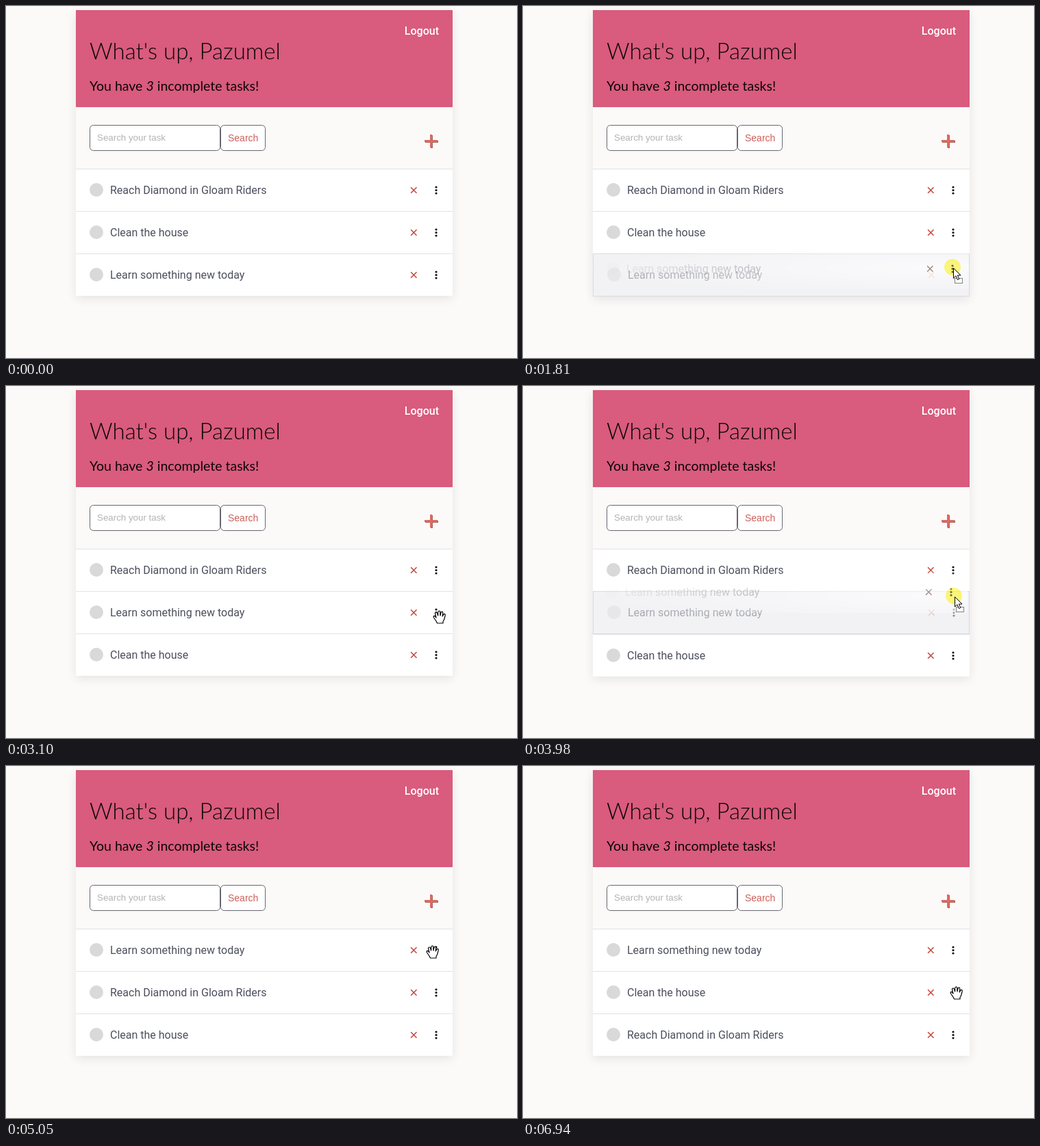
Recreate the animation shown at these times as an HTML page with a canvas. Size 746 by 515 pixels, loop 8530 ms.

```html
<!DOCTYPE html>
<html lang="en">
<head>
<meta charset="utf-8">
<title>Task list</title>
<style>
  html, body { margin: 0; width: 100%; height: 100%; overflow: hidden; background: #fbfaf9; }
  canvas { display: block; }
</style>
</head>
<body>
<canvas id="stage" width="746" height="515"></canvas>
<script>
const LOOP = 8530;
const FRAME = 68;       // pointer sampling interval
const SWAP_DELAY = 70;  // the list reacts one sample after the pointer
const CARD = { x: 102, y: 6, w: 550, h: 418, listTop: 238, row: 62 };
const TASKS = ['Reach Diamond in Gloam Riders', 'Clean the house', 'Learn something new today'];
const TITLE_FONT = 'Lato, "Open Sans", sans-serif';
const ROW_FONT = 'Roboto, "Noto Sans", sans-serif';
const FORM_FONT = '"Liberation Sans", Arial, sans-serif';

const smooth = p => (1 - Math.cos(Math.PI * p)) / 2;
const easeIn = power => p => p ** power;
const easeOut = p => 1 - (1 - p) ** 1.3;

// Pointer gestures; one with a drop time drags the row it starts on.
// "dip" bends the path downwards on the way.
const GESTURES = [
  { start: 330, end: 1080, from: [674, 480], to: [628, 395], ease: easeOut },
  { start: 1620, end: 2210, from: [629, 392], to: [622, 317], ease: smooth, drop: 2480 },
  { start: 2740, end: 3100, from: [623, 320], to: [633, 338], ease: smooth, dip: 62 },
  { start: 3300, end: 4110, from: [633, 338], to: [626, 276], ease: easeIn(4), drop: 4650 },
  { start: 5050, end: 5870, from: [623, 272], to: [636, 388], ease: smooth },
  { start: 6000, end: 6540, from: [638, 396], to: [634, 336], ease: easeIn(2.4), drop: 6800 },
  { start: 6800, end: 6940, from: [634, 335], to: [633, 332], ease: smooth }
];

const HAND = new Path2D('M-3.5 9L-5 6L-8.4 1Q-9.4-1-8-1.6Q-6.5-1.6-5 1L-6.5-5Q-6.5-7-5-7' +
  'Q-3.8-7-3.3-5L-2.4-2L-2.2-7.5Q-1.8-9-.6-9Q.8-9 .8-7.5L1-2L2-6.5Q2.6-8.2 3.8-7.8' +
  'Q5-7.5 4.7-5.5L4.2-1L5.8-3.8Q6.8-5 7.8-4.2Q8.6-3.5 8-1.5L6.5 4L5 6.5V9Z');
const ARROW = new Path2D('M.5 .5V15L4 11.8L6.4 17.5L8.8 16.5L6.4 11H11Z');

const ctx = document.getElementById('stage').getContext('2d');
const dragImage = document.createElement('canvas');
dragImage.width = CARD.w;
dragImage.height = CARD.row;
const dragCtx = dragImage.getContext('2d');

const rowTop = index => CARD.listTop + CARD.row * index;
const rowAt = y => Math.floor((y - CARD.listTop) / CARD.row);

function pointerAt(t) {
  const move = GESTURES.findLast(g => t >= g.start);
  if (!move) return null;
  const { start, end, from, to, ease, dip = 0 } = move;
  const steps = Math.round((end - start) / FRAME);
  const p = Math.min(1, Math.floor((t - start) / (end - start) * steps + .001) / steps);
  const [x, y] = from.map((v, i) => v + (to[i] - v) * ease(p));
  return [Math.round(x), Math.round(y + dip * Math.sin(Math.PI * p))];
}

// Replays the drags up to time t: the list order and the drag in progress.
function listAt(t) {
  const order = TASKS.slice();
  let drag = null;
  for (const g of GESTURES.filter(g => g.drop && t >= g.start)) {
    const home = rowAt(g.from[1]);
    const [task] = order.splice(home, 1);
    const seen = Math.max(g.start, Math.min(t, g.drop) - SWAP_DELAY);
    order.splice(rowAt(pointerAt(seen)[1]), 0, task);
    drag = t < g.drop ? { task, home, grab: g.from } : null;
  }
  return { order, drag };
}

function rect(c, color, x, y, w, h) {
  c.fillStyle = color;
  c.fillRect(x, y, w, h);
}

function disc(c, color, x, y, r) {
  c.fillStyle = color;
  c.beginPath();
  c.arc(x, y, r, 0, Math.PI * 2);
  c.fill();
}

function text(c, str, x, y, font, color, align = 'left') {
  c.font = font;
  c.fillStyle = color;
  c.textAlign = align;
  c.fillText(str, x, y);
  return x + c.measureText(str).width;
}

function box(x, y, w, h) {
  ctx.beginPath();
  ctx.roundRect(x + .5, y + .5, w - 1, h - 1, 5);
  ctx.fillStyle = '#fff';
  ctx.fill();
  ctx.strokeStyle = '#66666e';
  ctx.lineWidth = 1;
  ctx.stroke();
}

function plus(color, x, y) {
  rect(ctx, color, x, y + 8, 19, 3);
  rect(ctx, color, x + 8, y, 3, 19);
}

function cross(c, color, x, y, r) {
  c.strokeStyle = color;
  c.lineWidth = 1.6;
  c.beginPath();
  for (const side of [-r, r]) {
    c.moveTo(x - side, y - r);
    c.lineTo(x + side, y + r);
  }
  c.stroke();
}

function rowContent(c, task, x, y, crossColor = '#c4483f') {
  const middle = y + CARD.row / 2;
  disc(c, '#d9d9d9', x + 30, middle, 10);
  text(c, task, x + 50, middle + 6, '16px ' + ROW_FONT, '#4c4f5d');
  cross(c, crossColor, x + 493.3, middle + .5, 4.2);
  for (const dy of [-4.5, 0, 4.5]) disc(c, '#111', x + 526, middle + .5 + dy, 1.6);
}

function drawHeader(height) {
  ctx.save();
  ctx.shadowColor = 'rgba(0,0,0,.09)';
  ctx.shadowBlur = 14;
  ctx.shadowOffsetY = 4;
  rect(ctx, '#fff', CARD.x, CARD.y, CARD.w, height);
  ctx.restore();
  rect(ctx, '#d95b7d', CARD.x, CARD.y, CARD.w, 142);
  rect(ctx, '#fbfaf9', CARD.x, 148, CARD.w, 90);

  const ink = '#0b0508';
  text(ctx, 'Logout', 632, 42, '500 16px ' + ROW_FONT, '#fff', 'right');
  text(ctx, "What's up, Pazumel", 122, 78, '300 33px ' + TITLE_FONT, ink);
  const font = '19.5px ' + TITLE_FONT;
  let x = text(ctx, 'You have ', 122, 124, font, ink);
  x = text(ctx, '3', x, 124, 'italic ' + font, ink);
  text(ctx, ' incomplete tasks!', x, 124, font, ink);

  box(122, 174, 191, 38);
  box(313, 174, 66, 38);
  text(ctx, 'Search your task', 133, 197, '13.33px ' + FORM_FONT, '#b3b3b3');
  text(ctx, 'Search', 324, 198, '14px ' + FORM_FONT, '#cf5f5a');
  plus('#a5665f', 612, 189);
  plus('#dd6a62', 611, 188);
}

function drawList(order, dragged) {
  let y = CARD.listTop;
  for (const task of order) {
    const ghost = task === dragged;
    rect(ctx, ghost ? '#f2f2f5' : '#fff', CARD.x, y, CARD.w, CARD.row);
    rect(ctx, '#e0e3ea', CARD.x, y, CARD.w, 1);
    if (ghost) {
      ctx.strokeStyle = '#d9dbe3';
      ctx.lineWidth = 1;
      ctx.strokeRect(CARD.x + .5, y + .5, CARD.w - 1, CARD.row);
      ctx.globalAlpha = .45;
      rowContent(ctx, task, CARD.x + 1, y, '#dd9f7c');
      ctx.globalAlpha = 1;
      y++;
    } else {
      rowContent(ctx, task, CARD.x, y);
    }
    y += CARD.row;
  }
}

// Translucent copy of the row, fading in an ellipse around the grabbed point.
function drawDragImage({ task, home, grab }, [px, py]) {
  const c = dragCtx;
  const gx = grab[0] - CARD.x, gy = grab[1] - rowTop(home);
  rect(c, '#fff', 0, 0, CARD.w, CARD.row);
  rowContent(c, task, 0, 0, '#70483c');
  const fade = c.createRadialGradient(0, 0, 0, 0, 0, CARD.w);
  fade.addColorStop(0, 'rgba(0,0,0,.65)');
  fade.addColorStop(1, 'rgba(0,0,0,0)');
  c.save();
  c.globalCompositeOperation = 'destination-in';
  c.translate(gx, gy);
  c.scale(1, .08);
  rect(c, fade, -1000, -1000, 2000, 2000);
  c.restore();
  ctx.drawImage(dragImage, px - gx, py - gy);
}

function drawCursor([x, y], dragging) {
  const fromMiddle = y - rowTop(rowAt(y)) - CARD.row / 2;
  const onHandle = y < CARD.y + CARD.h && Math.abs(x - 628) <= 14 && Math.abs(fromMiddle) <= 20;
  const hand = !dragging && onHandle;
  if (dragging) {
    ctx.globalCompositeOperation = 'multiply';
    disc(ctx, '#fffa7c', x - 1, y - 1, 12);
    ctx.globalCompositeOperation = 'source-over';
  }
  ctx.save();
  ctx.translate(x, y);
  ctx.fillStyle = '#fff';
  ctx.strokeStyle = '#000';
  ctx.lineWidth = hand ? 1.2 : 1;
  ctx.lineJoin = 'round';
  if (dragging) {
    ctx.setLineDash([1, 1]);
    ctx.fillRect(2, 15, 12, 8);
    ctx.strokeRect(2.5, 15.5, 11, 7);
    ctx.setLineDash([]);
  }
  const shape = hand ? HAND : ARROW;
  ctx.fill(shape);
  ctx.stroke(shape);
  ctx.restore();
}

function draw(t) {
  const { order, drag } = listAt(t);
  const pointer = pointerAt(t);
  rect(ctx, '#fbfaf9', 0, 0, 746, 515);
  drawHeader(CARD.h + (drag ? 1 : 0));
  drawList(order, drag && drag.task);
  if (drag) drawDragImage(drag, pointer);
  if (pointer) drawCursor(pointer, Boolean(drag));
}

const began = performance.now();
function tick() {
  draw((performance.now() - began) % LOOP);
  requestAnimationFrame(tick);
}
tick();
</script>
</body>
</html>
```
